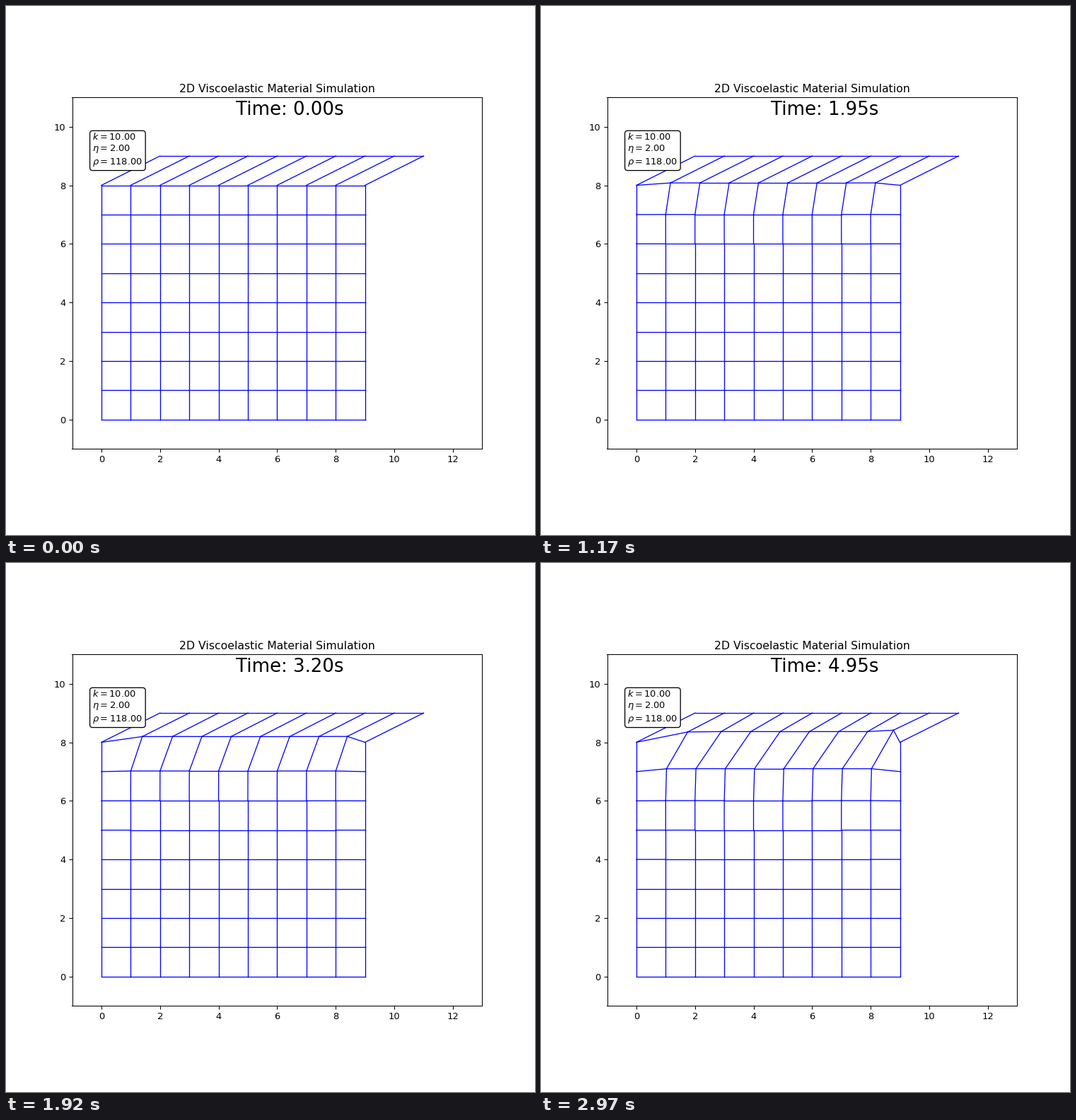
Recreate the animation shown at these times as a matplotlib script. Size 748 by 748 pixels, loop 3000 ms.

```python
import numpy as np
import matplotlib.pyplot as plt
from matplotlib.animation import FuncAnimation

N = 10                              # nodes per side
K, ETA, RHO = 10.0, 2.0, 118.0      # stiffness, viscosity, node mass
DT, FRAMES = 0.05, 100

idx = np.arange(N * N).reshape(N, N)    # idx[row, col]
springs = np.concatenate([
    np.stack([idx[:, :-1].ravel(), idx[:, 1:].ravel()], axis=1),
    np.stack([idx[:-1].ravel(), idx[1:].ravel()], axis=1),
])
A, B = springs.T

free = np.zeros((N, N), bool)
free[1:-1, 1:-1] = True
free = free.ravel()[:, None]


def forces(pos, vel):
    """Kelvin-Voigt force along every link, summed at the nodes."""
    d = pos[B] - pos[A]
    length = np.linalg.norm(d, axis=1, keepdims=True)
    d /= length
    rate = np.sum((vel[B] - vel[A]) * d, axis=1, keepdims=True)
    f = (K * (length - 1) + ETA * rate) * d
    total = np.zeros_like(pos)
    np.add.at(total, A, f)
    np.add.at(total, B, -f)
    return total


def simulate():
    cols, rows = np.meshgrid(np.arange(N), np.arange(N))
    pos = np.stack([cols.ravel(), rows.ravel()], axis=1).astype(float)
    pos[idx[-1], 0] += 2            # sheared top edge
    vel = np.zeros_like(pos)
    states = []
    for _ in range(FRAMES):
        states.append(pos)
        acc = forces(pos, vel) / RHO * free
        pos, vel = pos + vel * DT, vel + acc * DT
    return states


states = simulate()

fig, ax = plt.subplots(figsize=(8, 8), dpi=93.5)
ax.set_xlim(-1, 13)
ax.set_ylim(-1, 11)
ax.set_aspect("equal")
ax.set_title("2D Viscoelastic Material Simulation")

links = [ax.plot([], [], "b-", lw=1)[0] for _ in springs]
clock = ax.text(0.4, 0.95, "", transform=ax.transAxes, fontsize=20)
ax.text(0.05, 0.8,
        f"$k={K:.2f}$\n$\\eta={ETA:.2f}$\n$\\rho={RHO:.2f}$",
        transform=ax.transAxes, fontsize=10, va="bottom",
        bbox=dict(boxstyle="round", facecolor="white"))


def update(i):
    pos = states[i]
    for line, pair in zip(links, springs):
        line.set_data(pos[pair, 0], pos[pair, 1])
    clock.set_text(f"Time: {i * DT:.2f}s")
    return [*links, clock]


anim = FuncAnimation(fig, update, frames=FRAMES, interval=30,
                     init_func=lambda: update(0), repeat=True, repeat_delay=0)
plt.show()
```
